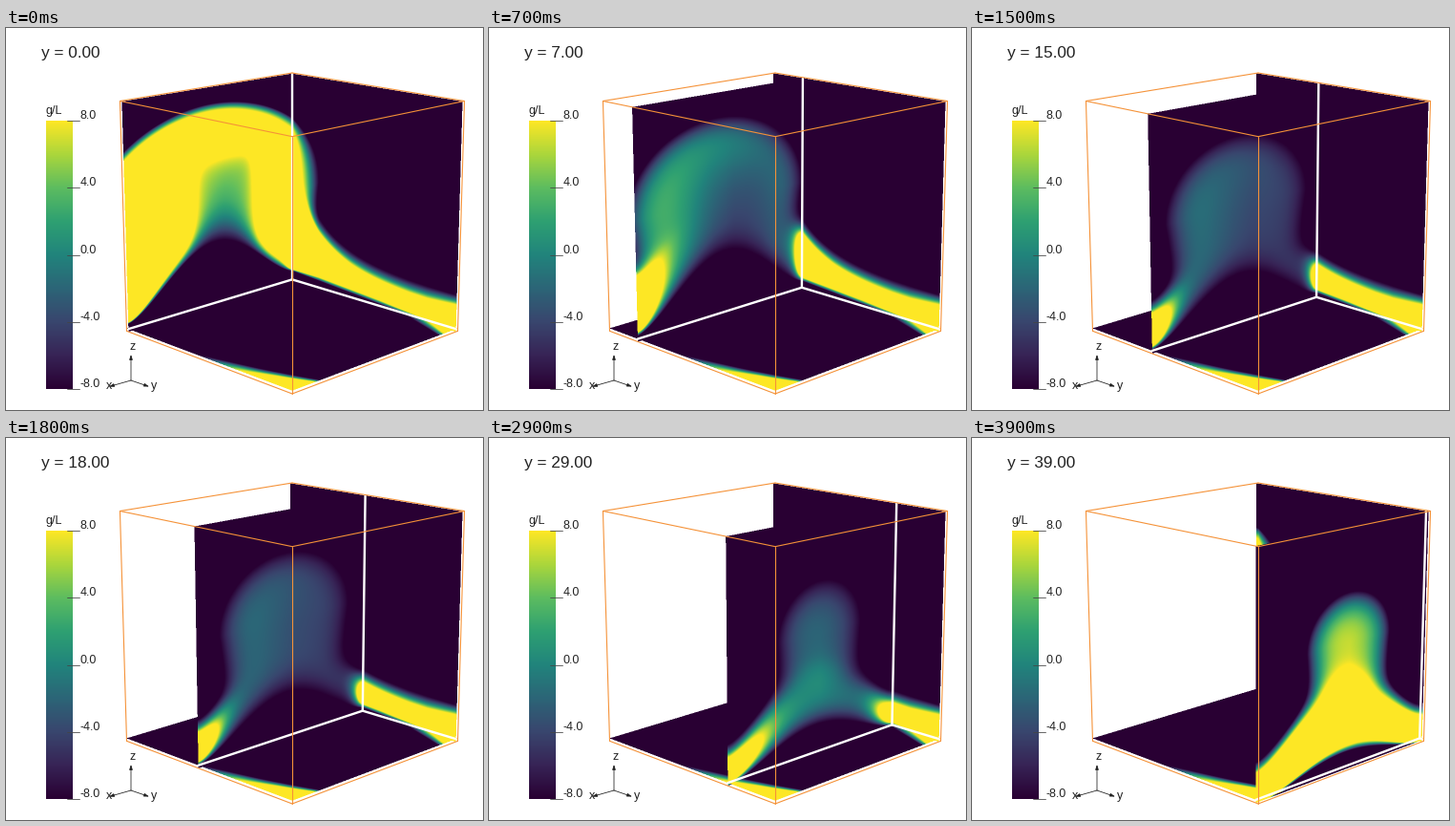
Recreate the animation shown at these times as a matplotlib script. Size 500 by 400 pixels, loop 4 s.

```python
import numpy as np
import matplotlib.pyplot as plt
from matplotlib.animation import FuncAnimation
from matplotlib.colors import LinearSegmentedColormap

W, H, DPI = 500, 400, 100
STEPS, INTERVAL = 40, 100
PX = 72 / DPI
ORANGE = "#f59238"
FONT = "Liberation Sans"
INSET = 0.5 / STEPS      # slices sit half a cell inside the box

plt.rcParams["font.family"] = FONT
cmap = LinearSegmentedColormap.from_list(
    "depth", ["#290033", "#372456", "#39466e", "#2c6577", "#21847c",
              "#2ea072", "#5cbc60", "#aad63c", "#fde725"], 512)

# Perspective of the unit box; columns are u (slice direction), s, z, 1.
w_row = np.array([-0.125, 0.125, -0.0438, 1.125])
x_row = 300 * w_row + 195.2 * np.array([1, 1, 0, -1])
y_row = np.array([26, -26, -274.3, 357])
PROJ = np.array([x_row, y_row, w_row])


def project(u, s, z):
    x, y, w = PROJ @ (u, s, z, 1)
    return x / w, y / w


# Shape of the concentration field at a few slice positions.
KEYS = [0, 7, 15, 22, 29, 33, 39]
SHAPE = {
    "hump":      [.25, .25, .20, .16, .125, .105, .085],
    "mid":       [.50, .47, .50, .515, .525, .525, .525],
    "half":      [.74, .52, .425, .345, .255, .24, .25],
    "zc":        [.40, .52, .53, .53, .52, .53, .53],
    "cap":       [.525, .375, .315, .27, .23, .22, .21],
    "plume":     [16, 2.8, -1, -1.6, -1.8, .3, 7],
    "core":      [5, -4, -3.8, -3.2, -1.8, .3, 7],
    "core_half": [.187, .25, .22, .2, .2, .2, .2],
    "core_soft": [.03, .08, .08, .08, .08, .08, .08],
    "base":      [0, 0, 0, .5, 3, 3.2, 10],
    "left":      [.14, .14, .13, .16, .215, .28, .35],
    "right":     [.06, .065, .07, .09, .145, .20, .25],
    "soft_t":    [.04, .085, .1, .1, .11, .11, .09],
    "soft_b":    [.04, .1, .1, .1, .08, .06, .035],
}


def sigmoid(x):
    return 0.5 + 0.5 * np.tanh(x / 2)


def field(u, s, z):
    """Concentration in g/L at box coordinates."""
    p = {k: np.interp(u * STEPS - 0.5, KEYS, v) for k, v in SHAPE.items()}
    arch = np.sin(np.pi * np.clip(s, 0, 1)) ** 1.5
    low = (.036 - .052 * u) * (1 - s) + (.055 - .062 * u) * s + p["hump"] * arch
    high = .16 + .4 * np.exp(-u / .22) + .25 * arch

    # rounded plume joined smoothly to the band below it
    neck = 1 - .12 * np.clip((p["zc"] - z) / .25, 0, 1)
    q = np.hypot((s - p["mid"]) / (p["half"] * neck),
                 np.maximum(z - p["zc"], 0) / p["cap"])
    blend = .04
    top = blend * np.logaddexp((high - z) / blend, (1 - q) * p["cap"] / blend)
    bottom = z - low

    core = (sigmoid((p["core_half"] - np.abs(s - .56)) / p["core_soft"])
            * sigmoid((.7 - z) / (p["core_soft"] + .01)))
    band = sigmoid((high - .03 - z) / .03)
    edge = band * np.maximum(np.exp(-(s / p["left"]) ** 2),
                             np.exp(-((1 - s) / p["right"]) ** 2))

    amp = p["plume"] + (p["core"] - p["plume"]) * core
    amp = amp + 4.5 * (.5 - s) + p["base"] * band
    amp = amp + (22 - amp) * edge

    soft_t = p["soft_t"] * (1 - .5 * edge)
    fade = .12 * np.exp(-((s - .56) / .17) ** 2) * np.clip(1 - 6 * u, 0, 1)
    soft_b = (p["soft_b"] + fade) * (1 - .75 * edge)
    inside = (np.tanh(np.maximum(top, 0) / soft_t)
              * np.tanh(np.maximum(bottom, 0) / soft_b))
    return -8.5 + (amp + 8.5) * inside


# Ray casting of the three planes on a supersampled pixel grid.
X0, X1, Y0, Y1, SS = 114, 486, 42, 390, 2
grid_x, grid_y = np.meshgrid(X0 + (np.arange((X1 - X0) * SS) + .5) / SS,
                             Y0 + (np.arange((Y1 - Y0) * SS) + .5) / SS)
RAYS = np.stack([grid_x, grid_y, np.ones_like(grid_x)]).reshape(3, -1)


def cast(axis, level):
    """Pixel indices, depth and colours where a plane of the box is seen."""
    rest = [i for i in range(3) if i != axis]
    m = PROJ[:, rest + [3]].copy()
    m[:, 2] += level * PROJ[:, axis]
    a, b, inv = np.linalg.inv(m) @ RAYS
    a, b, depth = a / inv, b / inv, 1 / inv
    hit = np.flatnonzero((a >= 0) & (a <= 1) & (b >= 0) & (b <= 1))
    pos = [None] * 3
    pos[rest[0]], pos[rest[1]], pos[axis] = a[hit], b[hit], level
    rgb = cmap((field(*pos) + 8) / 16)[:, :3]
    return hit, depth[hit], rgb


def paint(image, zbuf, layer):
    hit, depth, rgb = layer
    front = depth < zbuf[hit]
    zbuf[hit[front]] = depth[front]
    image[hit[front]] = rgb[front]


still_image = np.ones((RAYS.shape[1], 3))
still_depth = np.full(RAYS.shape[1], np.inf)
paint(still_image, still_depth, cast(1, 1 - INSET))
paint(still_image, still_depth, cast(2, INSET))


def render(u):
    image, zbuf = still_image.copy(), still_depth.copy()
    paint(image, zbuf, cast(0, u))
    return image.reshape(Y1 - Y0, SS, X1 - X0, SS, 3).mean(axis=(1, 3))


fig = plt.figure(figsize=(W / DPI, H / DPI), dpi=DPI, facecolor="white")
ax = fig.add_axes([0, 0, 1, 1])
ax.axis("off")


def segment(p, q, color, width, z):
    (xa, ya), (xb, yb) = p, q
    return ax.plot([xa, xb], [ya, yb], color=color, lw=width * PX,
                   solid_capstyle="round", zorder=z)[0]


def label(x, y, text, size, **kw):
    return ax.text(x, y, text, fontsize=size * PX, color="#222222",
                   va="baseline", **kw)


picture = ax.imshow(np.ones((Y1 - Y0, X1 - X0, 3)), extent=(X0, X1, Y1, Y0),
                    interpolation="nearest", zorder=1)

# colour bar
ax.imshow(np.linspace(1, 0, 281)[:, None], cmap=cmap, extent=(42, 70, 378, 97),
          interpolation="nearest", aspect="auto", zorder=1)
for i in range(5):
    y = 97 + 70.25 * i
    segment((64, y), (77, y), "#444444", 0.8, 2)
    label(78, y - 2, f"{8 - 4 * i:.1f}", 12.5)
label(42, 90, "g/L", 12.5)
title = label(37, 31, "", 17.2)

# axis triad
for tip, name, at in [((131, 342), "z", (133, 337)),
                      ((108, 375.5), "x", (108, 378)),
                      ((150, 375.5), "y", (155, 378))]:
    ax.annotate("", tip, (131, 369), zorder=4, arrowprops=dict(
        arrowstyle="-|>,head_length=0.3,head_width=0.1", color="#222222",
        lw=0.8 * PX, shrinkA=0, shrinkB=0, mutation_scale=10))
    label(*at, name, 12.5, ha="center")

# white crossings of the planes
wall_line, floor_line, seam_line = (
    segment((0, 0), (0, 0), "white", 2.4, 3) for _ in range(3))

# box edges that stay in view
for z in (0, 1):
    for end in ((0, 0), (1, 1)):
        segment(project(*end, z), project(1, 0, z), ORANGE, 1.1, 5)
for end in ((0, 0), (1, 1)):
    segment(project(*end, 1), project(0, 1, 1), ORANGE, 1.1, 5)
for u, s in ((0, 0), (1, 0), (1, 1)):
    segment(project(u, s, 0), project(u, s, 1), ORANGE, 1.1, 5)

ax.set_xlim(0, W)
ax.set_ylim(H, 0)
ax.set_aspect("auto")


def update(step):
    u = (step + .5) / STEPS
    wall = 1 - INSET
    picture.set_data(render(u))
    title.set_text(f"y = {step:.2f}")
    corner = project(u, wall, INSET)
    for line, end in ((wall_line, project(u, wall, 1)),
                      (floor_line, project(u, 0, INSET)),
                      (seam_line, project(1, wall, INSET))):
        line.set_data(*zip(corner, end))
    return picture, title, wall_line, floor_line, seam_line


anim = FuncAnimation(fig, update, frames=STEPS, interval=INTERVAL,
                     repeat=True, repeat_delay=0, blit=False)
plt.show()
```
